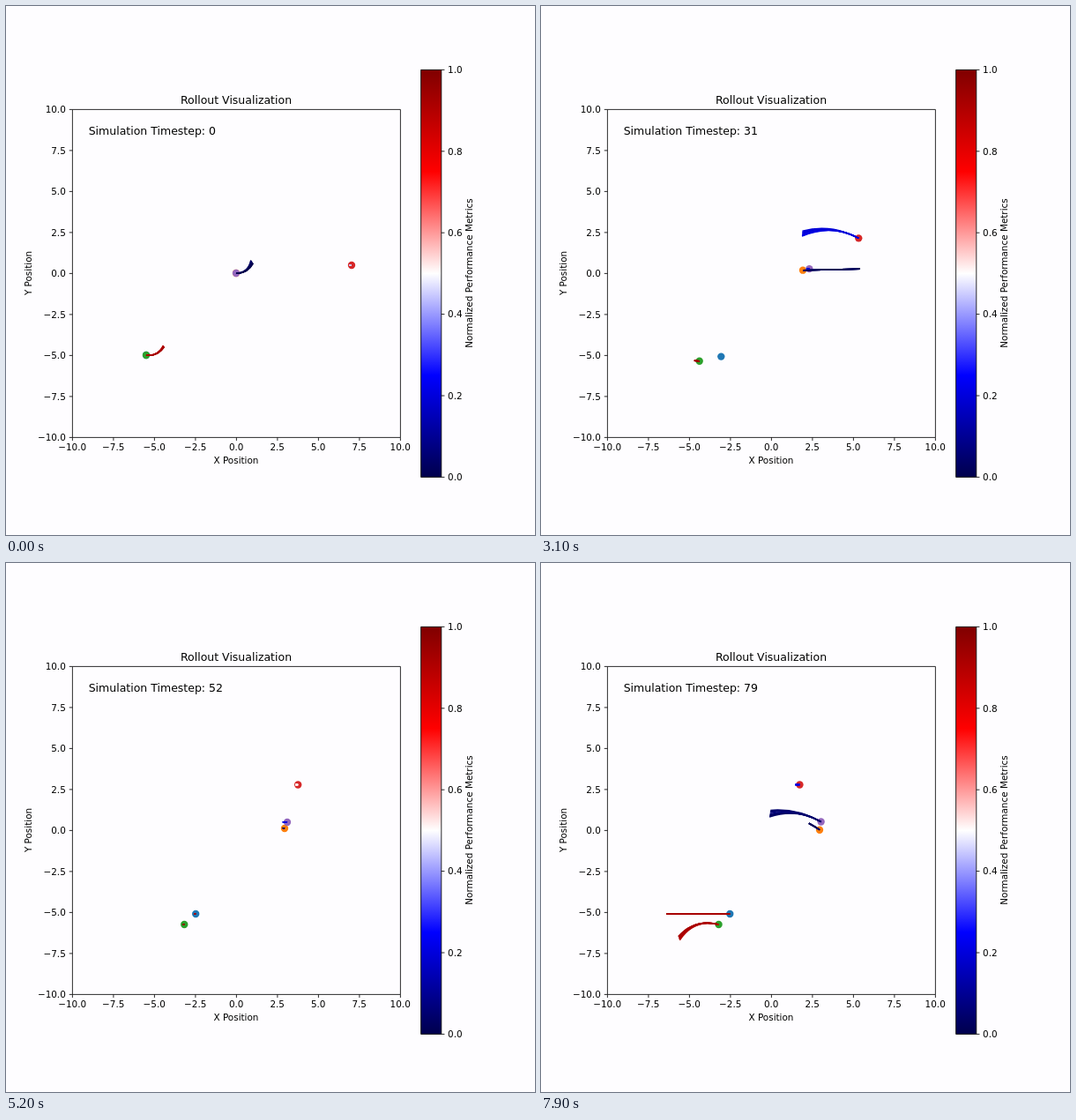
Write an HTML page that moves like this. It is 600x600 px and loops after 8000 ms.

```html
<!DOCTYPE html>
<html lang="en">
<head>
<meta charset="utf-8">
<title>Rollout Visualization</title>
<style>
  html, body { margin: 0; width: 100%; height: 100%; overflow: hidden; background: #fefdff; }
  svg { display: block; width: 600px; height: 600px; }
  text { font: 10.417px "DejaVu Sans", Verdana, sans-serif; fill: #000; }
  .big { font-size: 12.5px; }
  .frame { fill: none; stroke: #000; stroke-width: .83; }
  .roll { fill: none; stroke-width: 1.56; }
</style>
</head>
<body>
<svg id="stage" viewBox="0 0 600 600">
  <defs>
    <linearGradient id="seismic" x1="0" y1="1" x2="0" y2="0">
      <stop offset="0" stop-color="#00004c"/>
      <stop offset=".25" stop-color="#0000ff"/>
      <stop offset=".5" stop-color="#ffffff"/>
      <stop offset=".75" stop-color="#ff0000"/>
      <stop offset="1" stop-color="#800000"/>
    </linearGradient>
  </defs>
</svg>
<script>
const STEP = 100, STEPS = 80, LINES = 7, BURST = 9;
const stage = document.getElementById('stage');

function add(tag, attrs, text) {
  const el = document.createElementNS('http://www.w3.org/2000/svg', tag);
  for (const k in attrs) el.setAttribute(k, attrs[k]);
  if (text !== undefined) el.textContent = text;
  return stage.appendChild(el);
}
const label = (x, y, text, anchor = 'middle', cls = '') =>
  add('text', { x, y, 'text-anchor': anchor, class: cls }, text);
const upright = (x, y, text) =>
  add('text', { 'text-anchor': 'middle', transform: `translate(${x} ${y}) rotate(-90)` }, text);
const rule = d => add('path', { d, class: 'frame' });

// Chart furniture
for (let i = 0; i <= 8; i++) {
  const p = i * 46.5;
  const name = (i * 2.5 - 10).toFixed(1).replace('-', '\u2212');
  rule(`M${75.4 + p} 489.4v3.65`);
  rule(`M75.4 ${489.4 - p}h-3.65`);
  label(75.2 + p, 504.2, name);
  label(67.8, 493.2 - p, name, 'end');
}
rule('M75.4 117.4h372v372h-372z');
label(261, 111, 'Rollout Visualization', 'middle', 'big');
label(261, 519, 'X Position');
upright(28.7, 303, 'Y Position');

add('rect', { x: 470.6, y: 72.4, width: 23.2, height: 462, fill: 'url(#seismic)' });
rule('M470.6 72.4h23.2v462h-23.2z');
for (let i = 0; i <= 5; i++) {
  const y = 534.4 - i * 92.4;
  rule(`M493.8 ${y}h3.65`);
  label(501.1, y + 3.8, (i / 5).toFixed(1), 'start');
}
upright(528.6, 303, 'Normalized Performance Metrics');
const counter = label(93.7, 146.2, '', 'start', 'big');

const clamp = v => Math.min(1, Math.max(0, v));
const ease = (t, from, to) => (1 - Math.cos(Math.PI * clamp((t - from) / (to - from)))) / 2;
const wave = (t, peak, period) => Math.cos(2 * Math.PI * (t - peak) / period);
const sway = t => wave(t, 44, 24) * ease(t, 25, 44);
const noise = n => { const s = Math.sin(n * 12.9898) * 43758.5453; return s - Math.floor(s); };

// at: position, metric: colour value, loose: width of the fan,
// bursts: [peak step, reach x, reach y, curl]
const agents = [
  {
    color: '#1f77b4', loose: .03, stub: 0,
    at: t => [159 + 57.2 * ease(t, 0, 44) + 2 * sway(t), 396 + 2 * ease(t, 0, 44)],
    metric: t => .92 - .34 * Math.exp(-(((t - 18) / 8) ** 2)),
    bursts: [[18, 71, -1, 0], [44, -2, -19, 0], [60, -52, 42, .33], [71, -38, 0, 0], [79, -71, 0, 0]]
  },
  {
    color: '#ff7f0e', loose: .3, stub: 0,
    at: t => [261 + 55 * ease(t, 4, 49), 303 - 3.5 * Math.sin(Math.PI * t / 72) ** 2],
    metric: () => .02,
    bursts: [[31, 65, -1.5, 0], [44, -29, -7, 0], [60, -42, 14.5, .42], [71, -37, -13, .33], [79, -11, -7, 0]]
  },
  {
    color: '#2ca02c', loose: .15, stub: 0,
    at: t => [159 + 44 * ease(t, 14, 49) + 1.5 * sway(t), 396 + 14 * ease(t, 14, 49)],
    metric: t => .95 + .04 * wave(t, 20, 40),
    bursts: [[0, 20, -10, .33], [20, -58, 0, 0], [38, -50, -3, 0], [60, -52, 22, .33], [79, -45, 15.5, .33]]
  },
  {
    color: '#d62728', loose: .2, stub: -3,
    at: t => [392 - 1.4 * (t - 8.6 * (1 - Math.exp(-t / 9))), 251.5 + 42.5 * (1 - clamp(t / 43))],
    metric: t => .37 + .16 * wave(t, 56, 48),
    bursts: [[31, -61, -5, .23], [71, -67, 1, .04]]
  },
  {
    color: '#9467bd', loose: .33, stub: -3,
    at: t => [261 + 59.5 * ease(t, 2, 46) + 3 * sway(t), 303 - 8.5 * ease(t, 2, 46) ** 2 + sway(t)],
    metric: t => .12 - .1 * wave(t, 0, 88),
    bursts: [[0, 21, -13, .33], [18, 54, -44, .27], [44, -7, 2, .3], [60, -64, 5, .25], [79, -55, -9, .2]]
  }
];
for (const a of agents) a.dot = add('circle', { r: 4.2, fill: a.color });
for (const a of agents) {
  a.lines = Array.from({ length: LINES }, () => add('path', { class: 'roll' }));
}

function seismic(v) {
  const stops = [[0, 0, 76], [0, 0, 255], [255, 255, 255], [255, 0, 0], [128, 0, 0]];
  const p = Math.min(.9999, clamp(v)) * 4, i = Math.floor(p);
  return `rgb(${stops[i].map((c, k) => Math.round(c + (stops[i + 1][k] - c) * (p - i)))})`;
}

// Each burst swells and shrinks around its peak; overlapping ones add up
function reach(a, t) {
  let ex = a.stub, ey = 0, cx = ex / 2, cy = 0, bend = 0;
  for (const [peak, dx, dy, curl] of a.bursts) {
    const w = Math.cos(Math.PI / 2 * Math.min(1, Math.abs(t - peak) / BURST)) ** 2;
    ex += w * dx;
    ey += w * dy;
    cx += w * (dx / 2 - curl * dy);
    cy += w * (dy / 2 + curl * dx * (1));
    bend += w * curl;
  }
  return { ex, ey, cx, cy, bend };
}

function draw(step) {
  counter.textContent = 'Simulation Timestep: ' + step;
  agents.forEach((a, n) => {
    const [x, y] = a.at(step), { ex, ey, cx, cy, bend } = reach(a, step);
    a.dot.setAttribute('cx', x);
    a.dot.setAttribute('cy', y);
    a.lines.forEach((line, i) => {
      const seed = step * 41 + n * 9 + i;
      const side = 2 * i / (LINES - 1) - 1 + (noise(seed) - .5) * .3;
      const fan = side * a.loose * bend;
      line.setAttribute('d', `M${x} ${y}q${cx} ${cy} ${ex - fan * ey} ${ey + fan * ex}`);
      const shift = (noise(seed + 7) - .5) * a.loose * bend;
      line.setAttribute('stroke', seismic(a.metric(step) + shift));
    });
  });
}

let shown = -1;
function tick() {
  const step = Math.floor(performance.now() / STEP) % STEPS;
  if (step !== shown) draw(shown = step);
  requestAnimationFrame(tick);
}
tick();
</script>
</body>
</html>
```
